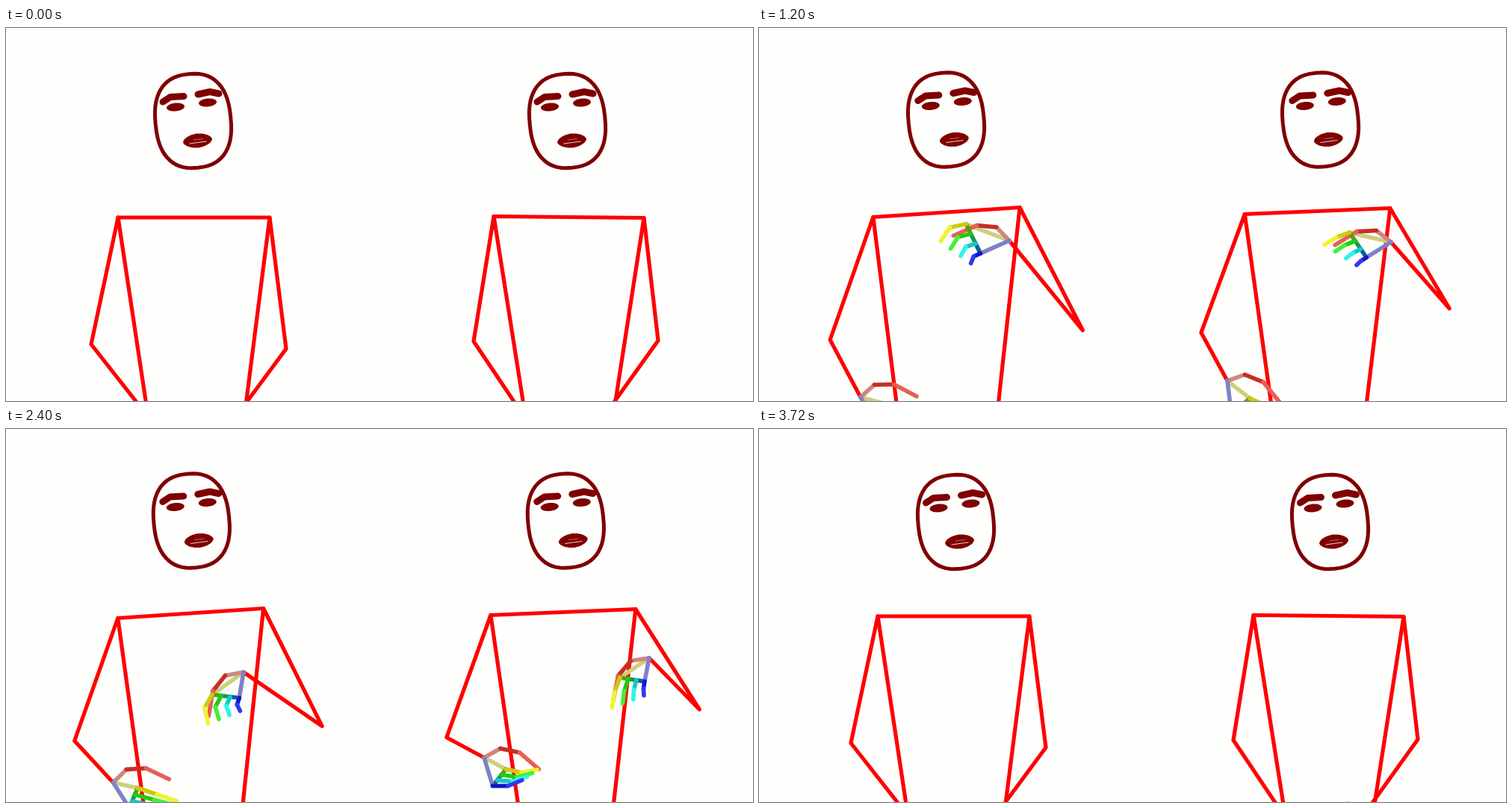
Write an HTML page with a canvas that moves like this. It is 1000 px wide and 500 px high and loops after 3760 ms.

```html
<!DOCTYPE html>
<html lang="en">
<head>
<meta charset="utf-8">
<title>Two signing figures</title>
<style>
html, body { margin: 0; width: 100%; height: 100%; overflow: hidden; background: #fefefd; }
canvas { display: block; width: 100vw; height: 100vh; }
</style>
</head>
<body>
<canvas id="stage" width="1000" height="500"></canvas>
<script>
const LOOP = 3760, STEP = 40;
const RAISE = 560, REACH = 1200, SIGN = 1600, HOLD = 2080, FOLD = 2720, LOWER = 2840, END = 3720;
const ctx = document.getElementById('stage').getContext('2d');

// Joints: shoulders, elbows and hips, each left then right.
// A hand pose is wrist x, y, palm length and angle, finger length and angle.
// drift is how far the wrist travels during the sign.
const figures = [
  {
    faceX: 0,
    rest: [[150, 254], [353, 254], [114, 424], [375, 430], [188, 506], [321, 506]],
    up: [[150, 253.5], [345, 240.5], [92, 418], [424, 399], [184.5, 506], [317, 506]],
    sway: [[0.9, 0], [1.3, 0], [1, 0], [3, 2], [0, 0], [1, 0]],
    hands: [
      { side: 1, bend: 0, rest: [205, 540], reach: [136, 495, 30, 15, 50, 20],
        sign: [131, 474, 38, 3, 62, 15], fold: [158, 486, 29, 22, 48, 22], drift: [-2, -12] },
      { side: -1, bend: 0.2, rest: [290, 545], reach: [335, 285, 62, 201, 41, 146],
        sign: [270, 319, 55, 183, 46, 117], fold: [358, 338, 48, 106, 32, 79], drift: [8, -5] }
    ]
  },
  {
    faceX: 501,
    rest: [[653, 252.5], [854, 254.5], [626, 420], [873, 419], [693, 506], [815, 506]],
    up: [[649, 249.5], [843, 241.5], [590, 413], [928, 376], [686, 506], [813, 506]],
    sway: [[0.4, 0], [0.6, 0], [0.6, -1.5], [-1.2, 0], [0, 0], [0, 0]],
    hands: [
      { side: 1, bend: 0.1, rest: [705, 538], reach: [627, 473, 38, 38, 43, 13],
        sign: [630, 434, 28, 16, 57, 0], fold: [642, 467, 38, 40, 27, 2], drift: [8, -20] },
      { side: -1, bend: 0.05, rest: [800, 521], reach: [846, 287, 57, 193, 37, 154],
        sign: [857, 266, 53, 179, 47, 133], fold: [866, 339, 41, 113, 36, 77], drift: [-1, 9] }
    ]
  }
];
const LEAVE = [9, -3];
const HUES = [60, 115, 178, 238];

const mix = (a, b, k) => a.map((v, i) => v + (b[i] - v) * k);
const add = (a, b, k = 1) => a.map((v, i) => v + (b[i] ?? 0) * k);
const polar = (len, deg) => [len * Math.cos(deg * Math.PI / 180), len * Math.sin(deg * Math.PI / 180)];
const hsl = (h, s, l) => `hsl(${h} ${s}% ${l}%)`;

function ease(from, to, t) {
  const k = Math.min(1, Math.max(0, (t - from) / (to - from)));
  return k * k * (3 - 2 * k);
}

function between(keys, t) {
  let i = 0;
  while (i < keys.length - 2 && t >= keys[i + 1][0]) i++;
  const [[t0, a], [t1, b]] = [keys[i], keys[i + 1]];
  return mix(a, b, ease(t0, t1, t));
}

// Offset from the chord of a to b, as a share of its length.
function bulge(a, b, along, out) {
  const [dx, dy] = [b[0] - a[0], b[1] - a[1]];
  return [a[0] + dx * along + dy * out, a[1] + dy * along - dx * out];
}

function line(color, ...pts) {
  ctx.beginPath();
  for (const p of pts) ctx.lineTo(...p);
  ctx.strokeStyle = color;
  ctx.stroke();
}

// Tilted superellipse: power 2 is an ellipse, less is an almond, more is boxy.
function blob(x, y, rx, ry, power, tilt) {
  const c = Math.cos(tilt), s = Math.sin(tilt);
  const bow = v => Math.sign(v) * Math.abs(v) ** (2 / power);
  ctx.beginPath();
  for (let i = 0; i < 60; i++) {
    const a = i * Math.PI / 30;
    const u = rx * bow(Math.cos(a)), v = ry * bow(Math.sin(a));
    ctx.lineTo(x + u * c - v * s, y + u * s + v * c);
  }
  ctx.closePath();
}

function drawFace(x0, up, sway, leave) {
  const dark = '#800000';
  const y = -1.5 * up;
  const head = x0 - 2 * up + 0.65 * sway + 13 * leave;
  const brow = x0 + 0.9 * sway + 13.5 * leave;
  const mouth = x0 + 2 * up + 0.9 * sway + 12 * leave;
  ctx.fillStyle = ctx.strokeStyle = dark;
  ctx.lineWidth = 5;
  blob(head + 250.5, y + 124.5, 50.5, 63, 2.45, -0.1);
  ctx.stroke();
  ctx.lineWidth = 9;
  line(dark, [brow + 210, y + 99], [brow + 220, y + 92.5], [brow + 238, y + 91.5]);
  line(dark, [brow + 257, y + 89], [brow + 273, y + 85.5], [brow + 285, y + 88]);
  for (const [ex, ey] of [[227, 106], [270, 100]]) {
    blob(brow + ex, y + ey, 12, 5.5, 2, -0.1);
    ctx.fill();
  }
  blob(mouth + 256.5, y + 151, 19.5, 9.5, 1.8, -0.12);
  ctx.fill();
  ctx.lineWidth = 1.2;
  line('#e8cfc8', [mouth + 246, y + 155], [mouth + 268, y + 152]);
  line('#b06a60', [mouth + 251, y + 150], [mouth + 263, y + 148.5]);
}

function drawBody(joints, wrists) {
  const [sl, sr, el, er, hl, hr] = joints;
  ctx.lineWidth = 5.2;
  line('#f00', hl, sl, sr, hr);
  line('#f00', sl, el, wrists[0]);
  line('#f00', sr, er, wrists[1]);
}

function handPose({ rest, reach, sign, fold, drift }, t) {
  const down = [...rest, ...reach.slice(2)];
  return between([[0, down], [RAISE, down], [REACH, reach], [SIGN, sign], [HOLD, add(sign, drift)],
    [FOLD, fold], [LOWER, fold], [END, add(down, LEAVE)]], t);
}

function drawHand({ side, bend }, [x, y, palm, palmDir, len, dir]) {
  const wrist = [x, y];
  const [rootRatio, tipRatio] = side > 0 ? [1.2, 0.95] : [0.68, 0.45];
  const index = add(wrist, polar(palm, palmDir));
  const little = add(wrist, polar(palm * rootRatio, palmDir + side * 45));
  const indexTip = add(index, polar(len, dir));
  const littleTip = add(little, polar(len * tipRatio, dir - 12));
  const roots = HUES.map((_, i) => mix(index, little, i / 3));
  const thumbTip = add(wrist, polar(75, palmDir - 16));
  const thumb = [0.25, 0.6].map(k => bulge(wrist, thumbTip, k, side * 0.22));

  ctx.lineWidth = 5.6;
  line(hsl(60, 45, 65), wrist, index);
  line(hsl(8, 45, 65), wrist, thumb[0]);
  line(hsl(4, 70, 46), ...thumb);
  line(hsl(4, 75, 62), thumb[1], thumbTip);
  for (let i = 1; i < 4; i++) line(hsl((HUES[i - 1] + HUES[i]) / 2, 80, 34), roots[i - 1], roots[i]);
  line(hsl(238, 40, 64), wrist, little);
  HUES.forEach((hue, i) => {
    const tip = mix(indexTip, littleTip, i / 3);
    const mid = bulge(roots[i], tip, 0.5, -bend);
    line(hsl(hue, 85, 43), roots[i], mid);
    line(hsl(hue, 88, 57), mid, tip);
  });
}

function draw(now) {
  const t = Math.floor((now % LOOP) / STEP) * STEP;
  const leave = ease(LOWER, END, t);
  const up = ease(RAISE, REACH, t) * (1 - leave);
  const sway = -3.2 * up * Math.cos(2 * Math.PI * (t - 2000) / 1700);
  ctx.fillStyle = '#fefefd';
  ctx.fillRect(0, 0, 1000, 500);
  ctx.lineCap = ctx.lineJoin = 'round';
  for (const fig of figures) {
    const joints = fig.rest.map((p, i) =>
      add(add(mix(p, fig.up[i], up), fig.sway[i], sway), LEAVE, leave));
    const poses = fig.hands.map(h => handPose(h, t));
    drawBody(joints, poses.map(p => p.slice(0, 2)));
    drawFace(fig.faceX, up, sway, leave);
    fig.hands.forEach((h, i) => drawHand(h, poses[i]));
  }
}

let start;
function tick(now) {
  start ??= now;
  draw(now - start);
  requestAnimationFrame(tick);
}
draw(0);
requestAnimationFrame(tick);
</script>
</body>
</html>
```
